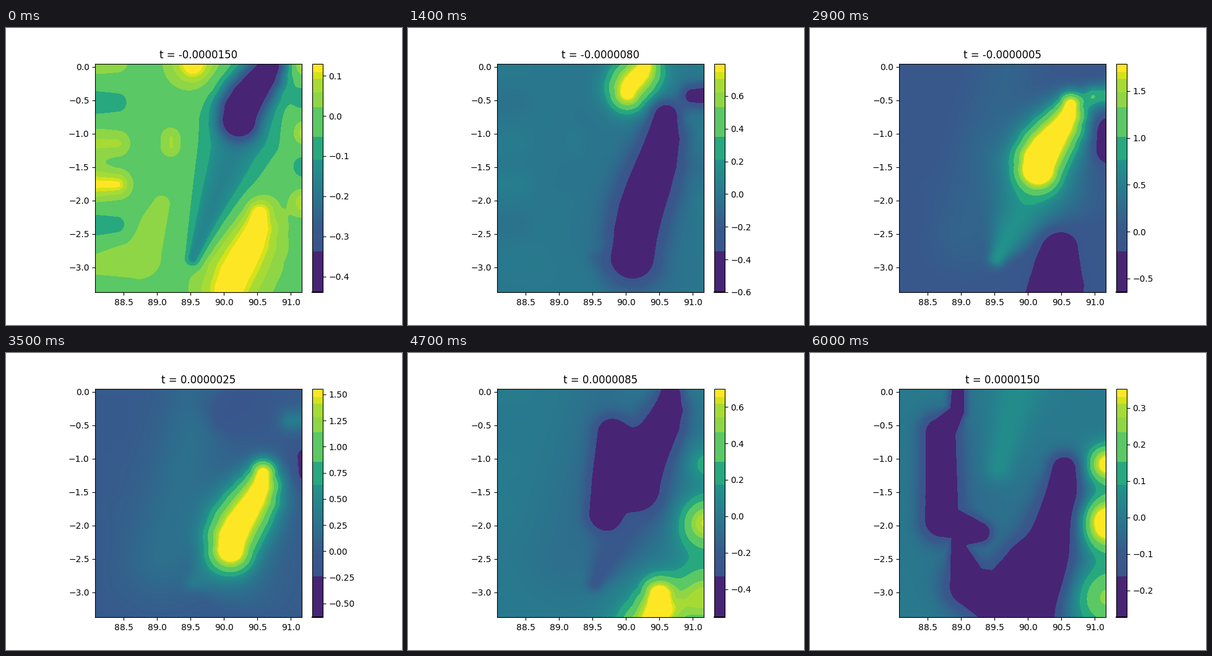
Animation, 640 px wide and 480 px high, one loop 6100 ms. Source, as a matplotlib script:

```python
import numpy as np
import matplotlib.pyplot as plt
from matplotlib.animation import FuncAnimation
from matplotlib.colors import LinearSegmentedColormap

W, H, DPI = 640, 480, 100
FRAMES, INTERVAL = 61, 100
LEFT, RIGHT, TOP, BOTTOM = 144.3, 478.3, 57.6, 427.2
BAR_LEFT, BAR_RIGHT = 495, 511.7
EXTENT = (88.073, 91.166, -3.374, 0.048)
START, STEP = -15, 0.5  # microseconds
DELAY = 10.5  # between crests of opposite sign

# Colour scale limits at a few moments
KEY_T = np.array([-15, -11.5, -5, -0.5, 6, 10.5, 15])
KEY_MIN = np.array([-0.439, -0.518, -0.650, -0.648, -0.594, -0.500, -0.2736])
KEY_MAX = np.array([0.130, 0.419, 1.174, 1.793, 1.000, 0.506, 0.3525])

# Each band runs from its start to the next one; two of them blend
BANDS = [
    (0, "#482475", "#482475"), (0.18, "#3a558c", "#38598c"),
    (0.28, "#38598c", "#2a768e"), (0.42, "#2a768e", "#21948b"),
    (0.58, "#27a87f", "#27a87f"), (0.68, "#5ac864", "#5ac864"),
    (0.81, "#8ed645", "#8ed645"), (0.875, "#a6db35", "#a6db35"),
    (0.935, "#d5e21a", "#d5e21a"), (0.965, "#fde725", "#fde725"),
]
stops = []
for i, (low, first, last) in enumerate(BANDS):
    high = BANDS[i + 1][0] if i + 1 < len(BANDS) else 1
    stops += [(low, first), (high, last)]
CMAP = LinearSegmentedColormap.from_list("bands", stops, N=512)

COLS, ROWS = 167, 185
X, Y = np.meshgrid(
    LEFT + (np.arange(COLS) + 0.5) * (RIGHT - LEFT) / COLS,
    TOP + (np.arange(ROWS) + 0.5) * (BOTTOM - TOP) / ROWS,
)


def ramp(x, a, b):
    """0 at a, 1 at b, clamped outside; a may exceed b."""
    return np.clip((x - a) / (b - a), 0, 1)


def ease(x, a, b):
    k = ramp(x, a, b)
    return k * k * (3 - 2 * k)


def bump(x, centre, width):
    return np.exp(-((x - centre) / width) ** 2)


def stroke(amp, *points):
    """Soft stroke through (x, y, radius) points in stage pixels."""
    if abs(amp) < 1e-4:
        return 0
    best = np.full(X.shape, -np.inf)
    for (x0, y0, r0), (x1, y1, r1) in zip(points, points[1:] or points):
        dx, dy = x1 - x0, y1 - y0
        s = np.clip(((X - x0) * dx + (Y - y0) * dy) / (dx * dx + dy * dy + 1e-9), 0, 1)
        d2 = (X - x0 - s * dx) ** 2 + (Y - y0 - s * dy) ** 2
        np.maximum(best, -d2 / (r0 + s * (r1 - r0)) ** 2, out=best)
    return amp * np.exp(best)


def smooth(t, values):
    """Cubic Hermite curve through the key values."""
    i = min(np.searchsorted(KEY_T, t, "right") - 1, len(KEY_T) - 2)
    slope = np.gradient(values, KEY_T)
    h = KEY_T[i + 1] - KEY_T[i]
    k = (t - KEY_T[i]) / h
    mix = k * k * (3 - 2 * k)
    return (values[i] * (1 - mix) + values[i + 1] * mix
            + h * k * (1 - k) * ((1 - k) * slope[i] - k * slope[i + 1]))


def crest(age, bright, limit):
    """One tilted crest that sinks, stretches and drags a wake to the left."""
    grown = max(age, 0)
    centre = 95 + (16 * age + age * age if age > 0 else 4 * age)
    half = max(8, 36 + 3.5 * age if bright else 50 + 9 * age)
    middle = 403 - 1.9 * grown + 9.5 * min(age, 0)
    lean = 26 * ramp(age, -8, 0)
    radius = 36 + 1.2 * grown
    points = [
        (middle - lean * np.sin(u * np.pi / 2), centre + u * half,
         radius * (1 - 0.3 * u * u + 0.15 * u))
        for u in np.linspace(-1, 1, 7)
    ]
    amp = 1.08 * limit * (1 if bright else ramp(age, -5, -1))
    x, y, _ = points[-1]
    wake = 0.35 * amp * ramp(age, -2, 0) * ramp(age, 9, 4)
    return (stroke(amp, *points)
            + stroke(wake, (x, y + 30, 1.7 * radius), (303, 372, 14)))


def ripples(t):
    """Weak stripes along both sides that fade after the start."""
    amp = 0.065 * np.exp(-(t - START) / 8)
    z = stroke(amp, (268, 178, 17), (268, 192, 17))
    z += stroke(0.6 * amp, (252, 285, 18), (215, 370, 46), (140, 383, 20))
    for i, gain in enumerate((0.7, -1.4, 1, 1.8, -1.3)):
        y = 55 + 66 * i
        z += stroke(gain * amp, (140, y, 26), (180, y, 20))
    for i in range(5):
        y = 58 + 56 * i
        z += stroke(1.4 * amp * (-1) ** i, (482, y, 20))
    return z


def east_edge(t, vmax):
    """Reflections on the right: one swing early, three spots late."""
    swing = 1.4 * bump(t, -3, 5) * np.sin((t + 3) * np.pi / 8)
    z = stroke(swing, (460, 110, 18), (490, 109, 21))
    z += stroke(-max(swing, 0), (483, 168, 21), (483, 195, 21))
    late = ease(t, 5, 10.5)
    k = (t - 10.5) / 4.5
    for y, radius, gain, change in ((180, 30, 0.65, 0.45), (275, 42, 1.3, 0), (395, 52, 1.05, -0.35)):
        z += stroke(vmax * late * (gain + change * k), (480, y, radius))
    return z


def left_side(t, vmin):
    swell = 0.25 * bump(t, 4, 8) * np.cos((t - 1) * np.pi / 12)
    z = stroke(swell, (320, 60, 55), (255, 330, 65))
    y = 55 + 30 * (t - 6)
    z += stroke(vmin * bump(t, 8.5, 4), (330, y, 26), (316, y + 130, 24))
    z += stroke(
        1.08 * vmin * ease(t, 10, 15),
        (240, 45, 12), (238, 95, 14), (211, 130, 30), (212, 270, 32),
        (275, 290, 17), (237, 305, 10), (258, 378, 38), (305, 402, 50), (350, 355, 38),
    )
    z += stroke(-0.35 * vmin * ease(t, 10, 15), (335, 50, 46), (305, 185, 24))
    return z


def field(t, vmin, vmax):
    z = ripples(t) + east_edge(t, vmax) + left_side(t, vmin)
    for k in range(-1, 3):
        bright = k % 2 == 1
        z = z + crest(t - START - DELAY * k, bright, vmax if bright else vmin)
    return z


def rect(x0, x1):
    return [x0 / W, 1 - BOTTOM / H, (x1 - x0) / W, (BOTTOM - TOP) / H]


fig = plt.figure(figsize=(W / DPI, H / DPI), dpi=DPI)
ax = fig.add_axes(rect(LEFT, RIGHT))
cax = fig.add_axes(rect(BAR_LEFT, BAR_RIGHT))
image = ax.imshow(np.zeros(X.shape), cmap=CMAP, extent=EXTENT, aspect="auto",
                  interpolation="bilinear", vmin=-1, vmax=1)
fig.colorbar(image, cax=cax)
cax.plot([0, 1], [0, 0], color="black", lw=1.44, transform=cax.transAxes, clip_on=False)
title = ax.set_title("")


def update(i):
    t = START + STEP * i
    vmin, vmax = smooth(t, KEY_MIN), smooth(t, KEY_MAX)
    image.set_data(field(t, vmin, vmax))
    image.set_clim(vmin, vmax)
    title.set_text(f"t = {t * 1e-6:.7f}")
    return image, title


anim = FuncAnimation(fig, update, frames=FRAMES, interval=INTERVAL,
                     repeat=True, repeat_delay=0, blit=False)
plt.show()
```
